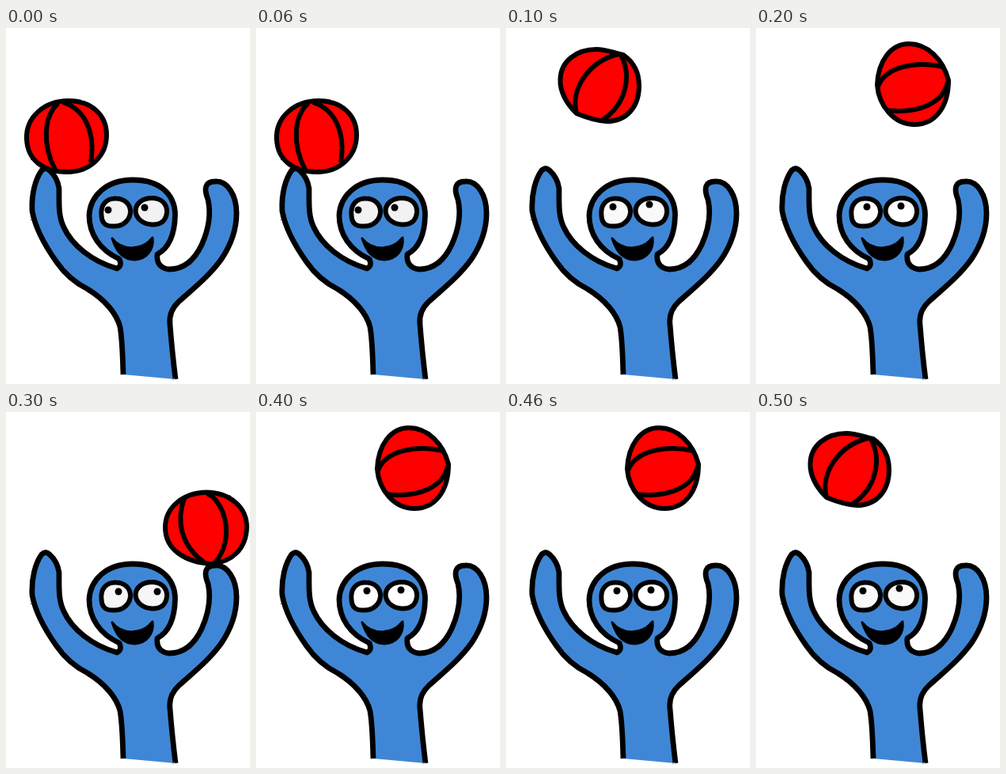
These frames come from a looping animation (308 px wide and 450 px high, 0.6 s). An HTML page:

```html
<!DOCTYPE html>
<html lang="en">
<head>
<meta charset="utf-8">
<title>Juggling a ball</title>
<style>
  html, body { margin: 0; width: 100%; height: 100%; overflow: hidden; background: #fff; }
  svg { display: block; width: 100vw; height: 100vh; }
  .ink { stroke: #000; stroke-width: 6; stroke-linejoin: round; }
  #body { stroke-width: 6.8; }
</style>
</head>
<body>
<svg viewBox="0 0 308 450">
  <defs>
    <filter id="rough" filterUnits="userSpaceOnUse" x="0" y="0" width="308" height="450" color-interpolation-filters="sRGB">
      <feTurbulence type="fractalNoise" baseFrequency=".2" numOctaves="2" seed="4"/>
      <feDisplacementMap in="SourceGraphic" scale="1.5" xChannelSelector="R" yChannelSelector="G"/>
    </filter>
  </defs>
  <g filter="url(#rough)">
    <path id="body" class="ink" fill="#3f87d6" d="M148 438 C147 412 147 396 144 378 C140 362 126 344 103 330
      C85 321 73 309 64 296 C49 275 37 254 33 231 C32 210 37 191 45 180 Q50 175 55 180
      Q65 189 67 203 C67 222 66 238 73 252 C83 274 108 295 140 304 Q147 301 143 292
      C119 281 105 261 105 237 C106 213 126 192 160 192 C193 192 213 209 213.5 236
      C213 260 206 278 191 286 Q189 303 206 305 C226 305 239 291 247 274
      C256 254 259 235 255 217 C249 202 252 194 264 194 C280 193 291 212 291 234
      C291 258 282 277 272 292 C257 313 238 328 218 346 Q205 358 207 375 C209 400 211 420 214 444"/>
    <g class="ink" id="eyes">
      <path d="M120.5 237 C119 223 127 215.5 138 215.5 C150 215.5 157.5 223 157 233 C156 244 147 250.5 137 250.5 C127 251 121 248 120.5 237Z"/>
      <path d="M163.5 231 C164 221 173 215 184 215 C196 215 203.5 222 203 233 C202 244 195 249 184 248.5 C173 248 164 241 163.5 231Z"/>
    </g>
    <circle class="pupil" r="4.5"/>
    <circle class="pupil" r="4.5"/>
    <path d="M134 266 C146 282 172 282 185 265 C187 281 177 292 163 293 C148 293 140 284 134 266Z"
      stroke="#000" stroke-width="3" stroke-linejoin="round"/>
    <path id="ball" class="ink" fill="#f00"/>
    <path id="seams" class="ink" fill="none"/>
  </g>
</svg>
<script>
const $ = id => document.getElementById(id);
const pupils = document.querySelectorAll('.pupil');

const poses = [
  { // resting on the left hand
    ball: 'M26 140 C25 113 48 92 79 92 C108 92 127 110 127 135 C127 162 106 182 77 182 C47 182 27 167 26 140Z',
    seams: 'M66 95 C48 111 45 146 62 179 M72 94 C101 103 113 134 107 170',
    eyes: [129, 230, 175, 227], white: '#f2f2f2'
  },
  { // rising on the left
    ball: 'M68.5 65 C69 42 89 27 114 27 C127 27 134 31 148 34 C161 43 168 57 168 73 C168 100 152 118 127 118 C112 117 101 113 89 108 C77 96 68 82 68.5 65Z',
    seams: 'M142 33 C104 42 81 78 89 108 M145 34 C160 62 150 98 122 116',
    eyes: [135, 226, 181, 223], white: '#faf9fa'
  },
  { // rising on the right
    ball: 'M153 72 C154 42 170 20 193 20 C216 20 236 39 243 66 C243 100 226 122 200 122 C175 122 155 99 153 72Z',
    seams: 'M154 74 C163 49 202 41 236 49 M165 104 C204 109 237 95 242 68',
    eyes: [140, 226, 183, 225], white: '#fff'
  },
  { // resting on the right hand
    ball: 'M201 146 C201 120 224 102 253 101.5 C283 102 304 120 304 146 C303 173 286 189 260 192 C226 190 201 174 201 146Z',
    seams: 'M225 109 C215 137 220 168 250 190 M254 103 C276 113 290 160 264 190',
    eyes: [142, 227, 191, 227], white: '#f6f6f6'
  }
];

function draw(now) {
  const step = Math.floor(now / 100) % 6;
  const { ball, seams, eyes, white } = poses[step < 4 ? step : 6 - step];
  $('ball').setAttribute('d', ball);
  $('seams').setAttribute('d', seams);
  $('eyes').setAttribute('fill', white);
  pupils.forEach((p, i) => {
    p.setAttribute('cx', eyes[2 * i]);
    p.setAttribute('cy', eyes[2 * i + 1]);
  });
}

const start = performance.now();
function tick() {
  draw(performance.now() - start);
  requestAnimationFrame(tick);
}
tick();
</script>
</body>
</html>
```
